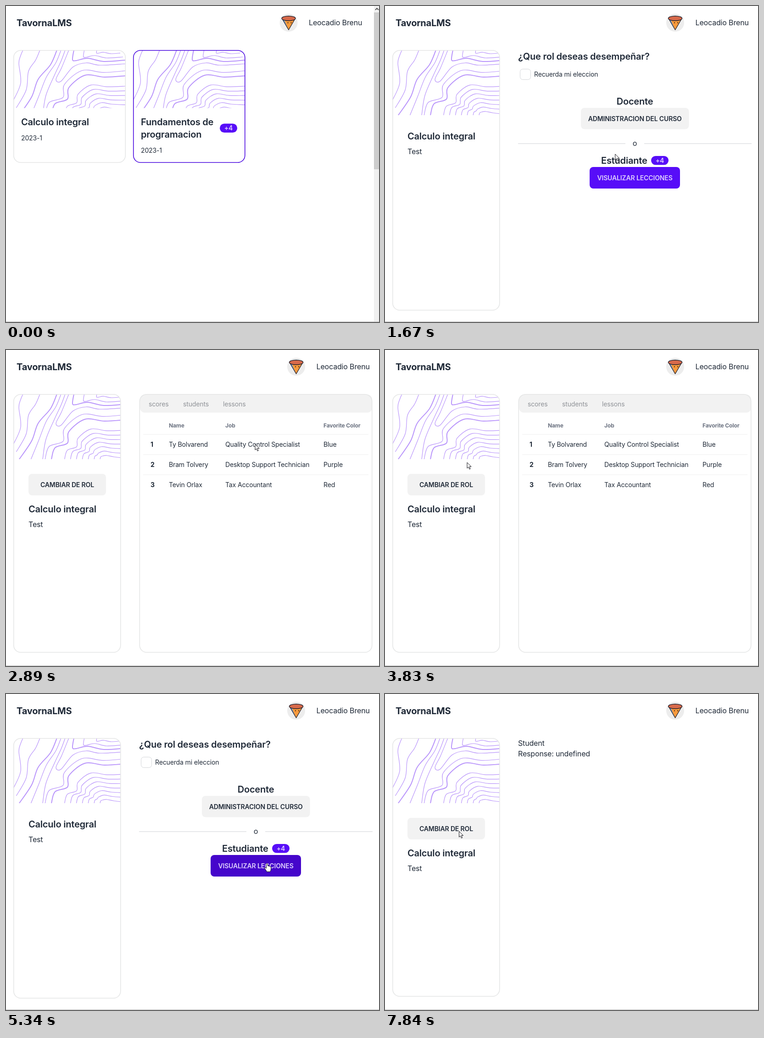
An HTML page for the animation above (8000 ms loop, 813 by 689 pixels).

```html
<!DOCTYPE html>
<html lang="es">
<head>
<meta charset="utf-8">
<style>
  html, body { margin: 0; width: 100%; height: 100%; overflow: hidden; background: #fff; }
  #stage { display: block; width: 100%; height: 100%; }
  text { font: 400 14px Inter, sans-serif; letter-spacing: -.01em; fill: #1f2937; }
  .md { font-size: 16px; }
  .title { font-size: 20px; font-weight: 600; }
  .brand { font-size: 20px; font-weight: 700; }
  .strong { font-weight: 600; }
  .index { font-weight: 700; }
  .mid { text-anchor: middle; }
  .light { fill: #e0d2fe; }
  .tab { fill: #8f9297; }
  .head { font-size: 12px; font-weight: 700; fill: #6b7280; }
</style>
</head>
<body>
<svg id="stage" viewBox="0 0 813 689"></svg>
<script>
const LOOP = 8000;
const PRIMARY = '#570df8', PRIMARY_HOVER = '#4506cb', GRAY = '#f2f2f2', GRAY_HOVER = '#e3e5e5', EDGE = '#e5e6e6';
const stage = document.getElementById('stage');

const text = (x, y, s, cls = '') => `<text x="${x}" y="${y}" class="${cls}">${s}</text>`;
const rect = (x, y, w, h, fill, more = '') =>
  `<rect x="${x}" y="${y}" width="${w}" height="${h}" fill="${fill}" ${more}/>`;
const outline = (x, y, w, h, color) =>
  rect(x + .75, y + .75, w - 1.5, h - 1.5, 'none', `rx="15.5" stroke="${color}" stroke-width="1.6"`);
const badge = (x, y) => rect(x, y, 38, 19.5, PRIMARY, 'rx="9.75"') +
  text(x + 19, y + 14.5, '+4', 'strong mid light');
const button = (b, label, cls = '') =>
  rect(b.x, b.y, b.w, b.h, b.fill, `rx="8" id="${b.id}"`) +
  text(b.x + b.w / 2, b.y + 28.5, label, 'strong mid ' + cls);

// Contour art: a few guide curves, the other lines are blended between them.
const guide = s => s.split(' ').map(p => p.split(',').map(Number));
const west = guide('16,206 32,168 28,125 32,108 37,96');
const ridge = guide('29,238 56,198 70,160 97,128 111,96');
const gully = guide('80,238 87,195 106,150 120,120 129,96');
const fold = guide('137,96 121,135 109,160 120,164 146,133 175,124 205,129 260,126');
const crest = guide('148,96 145,117 153,119 178,114 213,121 260,118');
const spur = guide('99,238 107,213 134,203 137,178 172,151 215,155 262,152');
const core = guide('205,238 206,234 208,232 211,231 220,230 235,233 262,236');
const corner = crest.map(() => [240, 90]);

const mix = (a, b, k) => a + (b - a) * k;
const blend = (a, b, k) => a.map((p, i) => p.map((v, j) => mix(v, b[i][j], k)));
function curve(pts, width = 1.2) {
  const at = i => pts[Math.max(0, Math.min(pts.length - 1, i))];
  let d = 'M' + pts[0];
  for (let i = 0; i < pts.length - 1; i++) {
    const c1 = at(i).map((v, j) => v + (at(i + 1)[j] - at(i - 1)[j]) / 6);
    const c2 = at(i + 1).map((v, j) => v - (at(i + 2)[j] - at(i)[j]) / 6);
    d += `C${c1} ${c2} ${at(i + 1)}`;
  }
  return `<path d="${d}" stroke-width="${width}"/>`;
}
const family = (a, b, from, to, count) => Array.from({ length: count },
  (_, i) => curve(blend(a, b, mix(from, to, i / (count - 1))))).join('');
const contours = [ridge, crest, spur].map(g => curve(g, 2)).join('') + curve(fold) +
  family(west, ridge, 0, .5, 2) + family(ridge, gully, .5, 1, 2) + family(crest, corner, .25, .55, 2) +
  curve(blend(spur, core, -.13)) + family(spur, core, .27, 1, 7);

const clip = (id, w, h) => `<clipPath id="${id}"><path d="M1 ${h}V16A15 15 0 0 1 16 1H${w - 16}A15 15 0 0 1 ${w - 1} 16V${h}Z"/></clipPath>`;
const card = (x, w, h, art, edge = EDGE) =>
  `<g transform="translate(${x} 96)"><g clip-path="url(#${art})"><use href="#contours"/></g></g>` +
  outline(x, 96, w, h, edge);

const teacher = { id: 'teacher', page: 1, x: 427, y: 222, w: 235.5, h: 46.5, fill: GRAY, hover: GRAY_HOVER };
const student = { id: 'student', page: 1, x: 446, y: 351, w: 197, h: 47, fill: PRIMARY, hover: PRIMARY_HOVER };
const swap = { id: 'swap', page: 2, x: 49, y: 270, w: 169, h: 47, fill: GRAY, hover: GRAY_HOVER };
const course = { page: 0, x: 277, y: 96, w: 244, h: 246 };
const buttons = [teacher, student, swap];

const courseInfo = y => text(49, y, 'Calculo integral', 'title') + text(49, y + 32, 'Test', 'md');
const sidebar = id => card(16, 234.5, 564, 'tall') + button({ ...swap, id }, 'CAMBIAR DE ROL') + courseInfo(354);

const home = card(16, 245, 246, 'wide') + card(277, 244.5, 246, 'wide', '#4b0ae0') +
  text(33, 260, 'Calculo integral', 'title') + text(33, 293, '2023-1') +
  text(294, 260, 'Fundamentos de', 'title') + text(294, 287, 'programacion', 'title') +
  text(294, 320, '2023-1') + badge(466, 256.5) +
  rect(802, 0, 11, 688, '#f0f0f0') + rect(802, 14, 11, 342, '#cdcdcd') +
  '<path d="M805 8.5l3.5-3.5 3.5 3.5" fill="none" stroke="#505050" stroke-width="1.8"/>';

const roles = card(16, 234.5, 568, 'tall') + courseInfo(291) +
  text(290, 117, '¿Que rol deseas desempeñar?', 'title') +
  rect(294.5, 137.5, 23, 23, '#fff', 'rx="6" stroke="#d4d6d9"') +
  text(325, 154, 'Recuerda mi eleccion') +
  text(544.5, 215, 'Docente', 'title mid') + button(teacher, 'ADMINISTRACION DEL CURSO') +
  rect(290, 299, 234, 2, '#e7e8ea') + rect(565, 299, 234, 2, '#e7e8ea') + text(544.5, 305, 'o', 'md mid') +
  text(471, 344, 'Estudiante', 'title') + badge(580, 327) + button(student, 'VISUALIZAR LECCIONES', 'light');

const columns = [355, 478, 692];
const people = [
  ['Ty Bolvarend', 'Quality Control Specialist', 'Blue'],
  ['Bram Tolvery', 'Desktop Support Technician', 'Purple'],
  ['Tevin Orlax', 'Tax Accountant', 'Red']
];
const tableRow = (cells, y, cls) => cells.map((s, i) => text(columns[i], y, s, cls)).join('');
const admin = sidebar('swap') +
  rect(292, 97, 506, 39.5, GRAY, 'rx="10"') + outline(290.5, 96, 508, 564, EDGE) +
  text(311, 123, 'scores', 'tab') + text(386, 123, 'students', 'tab') + text(473, 123, 'lessons', 'tab') +
  tableRow(['Name', 'Job', 'Favorite Color'], 169, 'head') +
  people.map((cells, r) => rect(299, 183.5 + 44 * r, 491, 1, '#f0f0f0') +
    text(315, 211 + 44 * r, r + 1, 'index') + tableRow(cells, 211 + 44 * r)).join('');

const lessons = sidebar('swapBack') +
  text(290, 113, 'Student', 'md') + text(290, 136, 'Response: undefined', 'md');

const header = text(23, 44, 'TavornaLMS', 'brand') +
  `<g id="user"><circle cx="616" cy="36.5" r="19.5" fill="#ededed"/>
   <path d="M602 28L616 52 630 28Z" fill="#f99a3c"/><path d="M602 28L616 52 606 30Z" fill="#64a3ee"/>
   <g stroke="#20202c" stroke-width="1.3" stroke-linejoin="round">
     <path d="M602 28L616 52 630 28" fill="none"/>
     <ellipse cx="616" cy="27" rx="15" ry="5" fill="#d86a4b"/></g>
   <circle cx="614.5" cy="36.5" r="1"/><circle cx="621.5" cy="36.5" r="1"/>
   ${text(660, 42, 'Leocadio Brenu', 'md')}</g>`;

stage.innerHTML = `<defs>${clip('wide', 245, 126.5)}${clip('tall', 234.5, 142.5)}
  <g id="contours" transform="translate(-16 -96)" fill="none" stroke="#b995fb">${contours}</g></defs>` +
  header + [home, roles, admin, lessons].map(p => `<g class="page">${p}</g>`).join('') +
  rect(0, 688, 813, 1, '#b9b9b9') +
  `<g id="cursor"><circle id="halo" r="12" fill="#f4ee16" opacity=".68"/>
   <g fill="#fff" stroke="#16161c" stroke-linejoin="round">
   <path id="arrow" d="M.5.5V13L3.4 10.3 5.6 15.2 7.6 14.3 5.5 9.5H9.5Z"/>
   <path id="hand" d="M-1.5 11V1.5Q0-.5 1.5 1.5V6Q3 5 4 6.500 6 6 6.500 7.500 8.500 7 8.500 9V13Q8.500 16 6.500 18.500H-.5Q-1.500 16-5 11.500-5.500 9-3.500 9.500Z"/>
   </g></g>`;

const el = id => document.getElementById(id);
const pages = [...document.querySelectorAll('.page')];
const show = (node, on) => node.style.display = on ? '' : 'none';

// Each move glides along a bent path to a point; some end in a click that opens a page.
const HALO = 205, OPEN = 280;
const entry = [620, 562];
const moves = [
  { leave: 170, arrive: 840, to: [386, 265], bend: [215, 365], click: 1110, opens: 1 },
  { leave: 1390, arrive: 2340, to: [550, 243], bend: [552, 390], click: 2550, opens: 2 },
  { leave: 2830, arrive: 4120, to: [118, 290], bend: [517, -20], click: 4370, opens: 1 },
  { leave: 4650, arrive: 5340, to: [569, 369], bend: [577, 320], click: 5610, opens: 3 },
  { leave: 5890, arrive: 6570, to: [170, 315], bend: [498, 390] },
  { leave: 6900, arrive: 7110, to: [162, 307], bend: [166, 311], click: 7370 },
  { leave: 7700, arrive: 7840, to: [161, 299], bend: [161, 303] }
];
const easeOut = u => 1 - (1 - u) ** 1.7;

function cursorAt(t) {
  const i = Math.max(0, moves.findLastIndex(m => m.leave <= t));
  const { leave, arrive, to, bend } = moves[i];
  const from = i ? moves[i - 1].to : entry;
  const k = easeOut(Math.max(0, Math.min(1, (t - leave) / (arrive - leave))));
  return from.map((v, j) => mix(mix(v, bend[j], k), mix(bend[j], to[j], k), k));
}

function draw(t) {
  const page = moves.findLast(m => m.opens && m.click + OPEN <= t)?.opens ?? 0;
  const [x, y] = cursorAt(t);
  const over = b => b.page === page && x >= b.x && x <= b.x + b.w && y >= b.y && y <= b.y + b.h;
  const pointing = [course, ...buttons].some(over);
  pages.forEach((p, i) => show(p, i === page));
  el('user').setAttribute('transform', `translate(${page ? 16.5 : 0})`);
  buttons.forEach(b => el(b.id).setAttribute('fill', over(b) ? b.hover : b.fill));
  show(el('cursor'), t >= moves[0].leave);
  show(el('hand'), pointing);
  show(el('arrow'), !pointing);
  show(el('halo'), moves.some(m => t >= m.click && t < m.click + HALO));
  el('cursor').setAttribute('transform', `translate(${x} ${y})`);
}

const start = performance.now();
function tick() {
  draw((performance.now() - start) % LOOP);
  requestAnimationFrame(tick);
}
tick();
</script>
</body>
</html>
```
